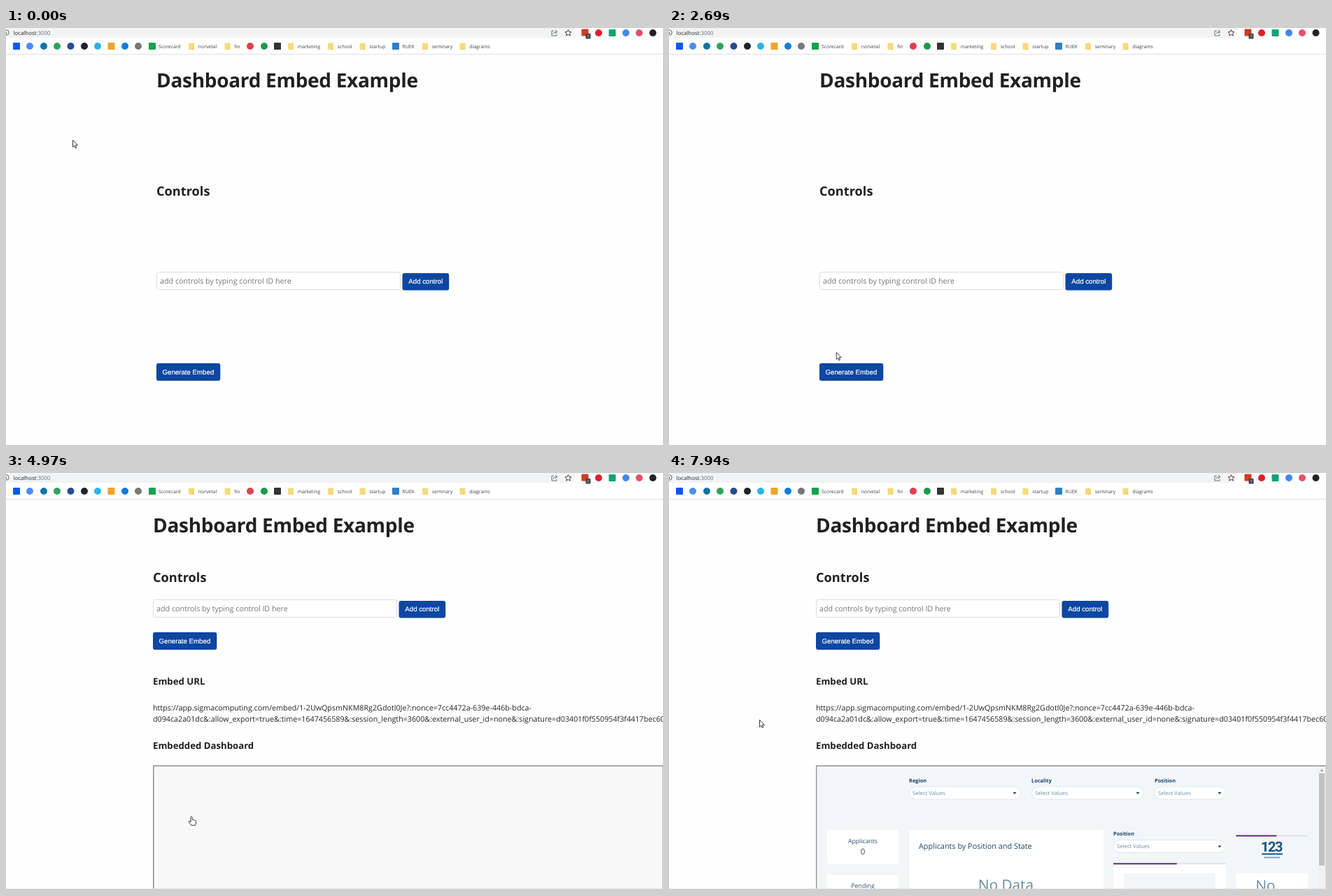
An HTML page for the animation above (8 s loop, 939 by 597 pixels).

```html
<!DOCTYPE html>
<html lang="en">
<head>
<meta charset="utf-8">
<title>Dashboard Embed Example</title>
<style>
  html, body { margin: 0; width: 100%; height: 100%; overflow: hidden; background: #fefefe; }
  svg { display: block; }
  text { font-family: "Open Sans", "Noto Sans", sans-serif; text-rendering: geometricPrecision; white-space: pre; }
  .bold { font-weight: 700; fill: #212121; }
  .title { font-size: 28px; letter-spacing: -.3px; }
  .body { font-size: 10.72px; fill: #242424; }
  .hint { fill: #757575; }
  .button { font: 9.7px "Liberation Sans", Arial, sans-serif; fill: #fff; stroke: #fff; stroke-width: .2; }
  .mark { font-size: 6.85px; fill: #3c4043; }
  .label { font-weight: 700; fill: #154367; }
  .plain .label { font-family: "Liberation Sans", Arial, sans-serif; }
  .value { font-size: 7.75px; fill: #6c8ca6; }
  .card { fill: #2b5069; }
  .digits { font: 700 20px Roboto, sans-serif; letter-spacing: -1.5px; fill: #175480; }
  .mid { text-anchor: middle; }
</style>
</head>
<body>
<svg width="939" height="597" viewBox="0 0 939 597">
  <rect width="939" height="37" fill="#fff"/>
  <rect x="-20" y="-7" width="833" height="21" rx="10" fill="#f1f3f4"/>
  <rect y="37" width="939" height="1" fill="#dfe1e4"/>
  <g fill="none" stroke="#5f6368">
    <circle cx=".5" cy="6.5" r="3.7"/>
    <path d="M.5 5.8V8.6"/>
    <path d="M783 4H780V11H787V9M782 8.5Q782.5 5.5 787 5.5M785 3 788 5.5 785 8" stroke-width=".9"/>
    <path d="M803.5 2.5 804.8 5.4 808 5.7 805.6 7.8 806.3 11 803.5 9.3 800.7 11 801.4 7.8 799 5.7 802.2 5.4Z" stroke="#333" stroke-width=".9"/>
  </g>
  <text x="10.5" y="9.6" font-size="7.86" fill="#202124">localhost<tspan fill="#6b6f73">:3000</tspan></text>
  <g id="bookmarks"></g>

  <g class="row">
    <text class="bold title" x="215" y="84.8">Dashboard Embed Example</text>
  </g>
  <g class="row">
    <text class="bold" x="215" y="240.3" font-size="18.2">Controls</text>
  </g>
  <g class="row">
    <rect x="215.5" y="349.5" width="348" height="25" rx="3" fill="#fff" stroke="#dcdcdc"/>
    <text class="body hint" x="220" y="366.4">add controls by typing control ID here</text>
    <rect x="566.5" y="351" width="66.7" height="24.5" rx="3" fill="#0d47a1"/>
    <text class="button" x="575.3" y="366.4">Add control</text>
  </g>
  <g class="row">
    <rect id="generate" x="215" y="480" width="91.3" height="25" rx="3"/>
    <text class="button" x="223.5" y="496">Generate Embed</text>
  </g>

  <g id="result">
    <text class="bold" x="210" y="302.8" font-size="13.2">Embed URL</text>
    <text class="body" x="210" y="339.7">https://app.sigmacomputing.com/embed/1-2UwQpsmNKM8Rg2Gdotl0Je?:nonce=7cc4472a-639e-446b-bdca-</text>
    <text class="body" x="210" y="356">d094ca2a01dc&amp;:allow_export=true&amp;:time=1647456589&amp;:session_length=3600&amp;:external_user_id=none&amp;:signature=d03401f0f550954f3f4417bec607</text>
    <text class="bold" x="210" y="394.7" font-size="13.2">Embedded Dashboard</text>
    <rect x="210" y="418.5" width="729" height="180" fill="#8f8f8f"/>
    <rect x="211.5" y="420" width="727" height="180" fill="#f8f8f8"/>
    <g id="dashboard">
      <rect x="211.5" y="420" width="717" height="180" fill="#f2f6f9"/>
      <rect x="928" y="420" width="10.5" height="180" fill="#f1f1f1"/>
      <rect x="929" y="430" width="8" height="132" fill="#c1c1c1"/>
      <path d="M930.5 427H935.5L933 424Z" fill="#a3a3a3"/>
      <g id="filters"></g>
      <g id="cards"></g>
      <g id="content">
        <g class="card">
          <text class="mid" x="277" y="530.3" font-size="8.7">Applicants</text>
          <text class="mid" x="277" y="546" font-size="11.5">0</text>
          <text class="mid" x="277" y="594" font-size="8.8">Pending</text>
          <text x="357" y="538" font-size="10.87" fill="#1a4567">Applicants by Position and State</text>
        </g>
        <rect x="650" y="573" width="131" height="25" fill="#f2f6f9"/>
        <rect x="810.5" y="519" width="102.5" height="40" fill="#f2f6f9"/>
        <text class="digits mid" x="861" y="542">123</text>
        <path d="M847 545.5H877" stroke="#175480" stroke-width="2"/>
        <path d="M850.5 550.5H873" stroke="#7fa6c0" stroke-width="2"/>
        <g id="waiting">
          <rect x="357" y="544" width="249" height="54" fill="#f2f6f9"/>
          <path d="M467 586H475V598H467ZM478 569H486V598H478ZM489 577H497V598H489Z" fill="#1d5780"/>
          <path d="M467 593.5H475M478 593.5H486M489 593.5H497" stroke="#7fa6c0" stroke-width="2"/>
          <rect x="825" y="587" width="74" height="10" fill="#f2f6f9"/>
          <circle cx="862" cy="604" r="10.5" fill="none" stroke="#1d5780" stroke-width="3"/>
        </g>
        <g id="empty" font-size="20.7" fill="#638ba8">
          <text class="mid" x="481.5" y="597">No Data</text>
          <text x="838.5" y="598">No</text>
        </g>
        <g id="bars"></g>
      </g>
    </g>
    <rect y="595" width="939" height="2" fill="#fefefe"/>
    <rect y="595.5" width="939" height="1.2" fill="#b9b9b9"/>
  </g>

  <circle id="click" cx="264.5" cy="491.5" r="7" fill="#ff0" fill-opacity=".47"/>
  <g id="cursor" fill="#fff" stroke="#222" stroke-width=".9" stroke-linejoin="round">
    <path id="arrow" d="M.5.5V10.5L2.7 8.4 4.2 11.9 5.8 11.2 4.4 7.8H7.4Z"/>
    <path id="hand" d="M-1 1.5Q0-.5 1.2 1.5V5.5Q2.5 4.7 3.2 5.8 4.6 5.2 5.2 6.5 6.6 6.2 6.6 7.8V10Q6.3 11.5 5.5 13.3H-.5Q-2 10.8-3.7 8.6-4 7-2.6 7.3L-1 8.6Z"/>
  </g>
</svg>
<script>
const $ = id => document.getElementById(id);
const show = (id, on) => { $(id).style.display = on ? '' : 'none'; };

const square = (x, y, color) => `<rect x="${x - 5}" y="${y - 5}" width="10" height="10" rx="1" fill="${color}"/>`;
const disc = (x, y, color) => `<circle cx="${x}" cy="${y}" r="5" fill="${color}"/>`;
const folder = x => `<rect x="${x}" y="21.5" width="8" height="9.5" rx=".8" fill="#f8da7c"/>
  <path d="M${x + 5.5} 31V29H${x + 8}" fill="none" stroke="#e8c04f" stroke-width=".6"/>`;
const mark = (x, label) => `<text class="mark" x="${x}" y="28.6">${label}</text>`;

const discs = [[34, 26, '#4b8df5'], [54, 26, '#1474a4'], [73, 26, '#2fa35b'], [92.5, 26, '#254d8f'],
  [112, 26, '#20242a'], [131, 26, '#2bb3e6'], [170, 26, '#127be0'], [189, 26, '#777'],
  [349, 26, '#e23e51'], [369, 26, '#1c9a4a'], [847, 7, '#e0202c'], [886, 7, '#4286f5'],
  [905, 7, '#e8506a'], [924.5, 7, '#222']];
const squares = [[15, 26, '#0b57f0'], [150.5, 26, '#eda52b'], [209, 26, '#16a24b'], [388, 26, '#333'],
  [557, 26, '#2f7fc4'], [827.5, 6.5, '#d23a22'], [866.5, 7, '#14a374']];
const folders = [[261, 'norvetal'], [312.5, 'fin'], [403, 'marketing'], [460, 'school'],
  [505.5, 'startup'], [595, 'seminary'], [648.5, 'diagrams']];
$('bookmarks').innerHTML =
  discs.map(d => disc(...d)).join('') + squares.map(s => square(...s)).join('') +
  folders.map(([x, label]) => folder(x) + mark(x + 13.8, label)).join('') +
  mark(218, 'Scorecard') + mark(566.5, 'RUEK') +
  `<rect x="828.5" y="8" width="7" height="7.5" rx="1" fill="#444"/>
   <text class="mid" x="832" y="14" font-size="6" fill="#fff">1</text>`;

const filters = [['Region', 343, 449, 160], ['Locality', 518, 449, 161],
  ['Position', 694, 449, 102], ['Position', 635, 525.5, 161]];
$('filters').innerHTML = filters.map(([label, x, y, w]) => `
  <text class="label" x="${x}" y="${y - 6.2}">${label}</text>
  <rect x="${x + .5}" y="${y}" width="${w - 1}" height="18" rx="9" fill="#fff" stroke="#dde6ed"/>
  <text class="value" x="${x + 5}" y="${y + 11.7}">Select Values</text>
  <path d="M${x + w - 11.5} ${y + 8}h5l-2.5 3z" fill="#1f4564"/>`).join('');

// x, y, width, height, time loaded, relative loading speed
const cards = [[226, 511, 102, 49, 7300, 1.15], [226, 575, 102, 30, 7140, 2.17],
  [343, 511, 278, 90, 7600, 1], [635, 559, 161, 40, Infinity, 1],
  [810.5, 519, 102.5, 39.5, Infinity, 1], [810.5, 573, 102.5, 30, 7600, 1]];
$('cards').innerHTML = cards.map(([x, y, w, h]) =>
  `<rect x="${x}" y="${y}" width="${w}" height="${h}" rx="3" fill="#fff"/>`).join('');
$('bars').innerHTML = cards.map(([x, y, w]) => `<g>
  <rect x="${x}" y="${y - .5}" width="${w}" height="1.8" fill="#e6dbe9"/>
  <rect x="${x}" y="${y - .5}" height="1.8" fill="#5d1a70"/></g>`).join('');
const bars = [...$('bars').children];
const rows = document.querySelectorAll('.row');

// start, end, steps, target x, target y
const moves = [[70, 120, 2, 85, 154], [830, 980, 3, 87, 175], [1220, 2000, 11, 95, 302],
  [2060, 2840, 11, 260, 488], [2930, 3000, 2, 265, 491], [6290, 7050, 11, 141, 366],
  [7140, 7940, 11, 129, 353]];

function pointer(t) {
  let x = 95, y = 160;
  for (const [start, end, steps, toX, toY] of moves) {
    if (t < start) break;
    // The slack absorbs step times rounded to 10 ms
    const step = Math.floor((t - start) / (end - start) * (steps - 1) + .1) + 1;
    const k = 1 - (1 - Math.min(1, step / steps)) ** 1.2;
    x += (toX - x) * k;
    y += (toY - y) * k;
  }
  return [x, y];
}

function draw(t) {
  const generated = t >= 3580, loading = t >= 6290, loaded = t >= 7600;
  const [x, y] = pointer(t);
  const hover = !generated && x > 215 && y > 480;
  const hand = hover || generated && !loading;

  rows.forEach((row, i) => row.setAttribute('transform', generated ? `translate(-5 ${-84 * i})` : ''));
  $('generate').setAttribute('fill', hover ? '#1266e3' : '#0d47a1');
  show('result', generated);
  show('dashboard', t >= 6130);
  show('content', loading);
  show('waiting', !loaded);
  show('empty', loaded);
  $('filters').setAttribute('class', loading ? '' : 'plain');
  $('filters').setAttribute('font-size', loading ? 7.4 : 8.4);

  const progress = .59 * (1 - Math.exp((6290 - t) / 528));
  cards.forEach(([, , w, , done, speed], i) => {
    bars[i].style.display = t < done ? '' : 'none';
    bars[i].lastElementChild.setAttribute('width', w * Math.max(0, Math.min(1, progress * speed)));
  });

  show('click', t >= 3230 && t < 3340);
  show('hand', hand);
  show('arrow', !hand);
  $('cursor').setAttribute('transform', `translate(${x} ${y})`);
}

function tick() {
  draw(performance.now() % 8000);
  requestAnimationFrame(tick);
}
tick();
</script>
</body>
</html>
```
